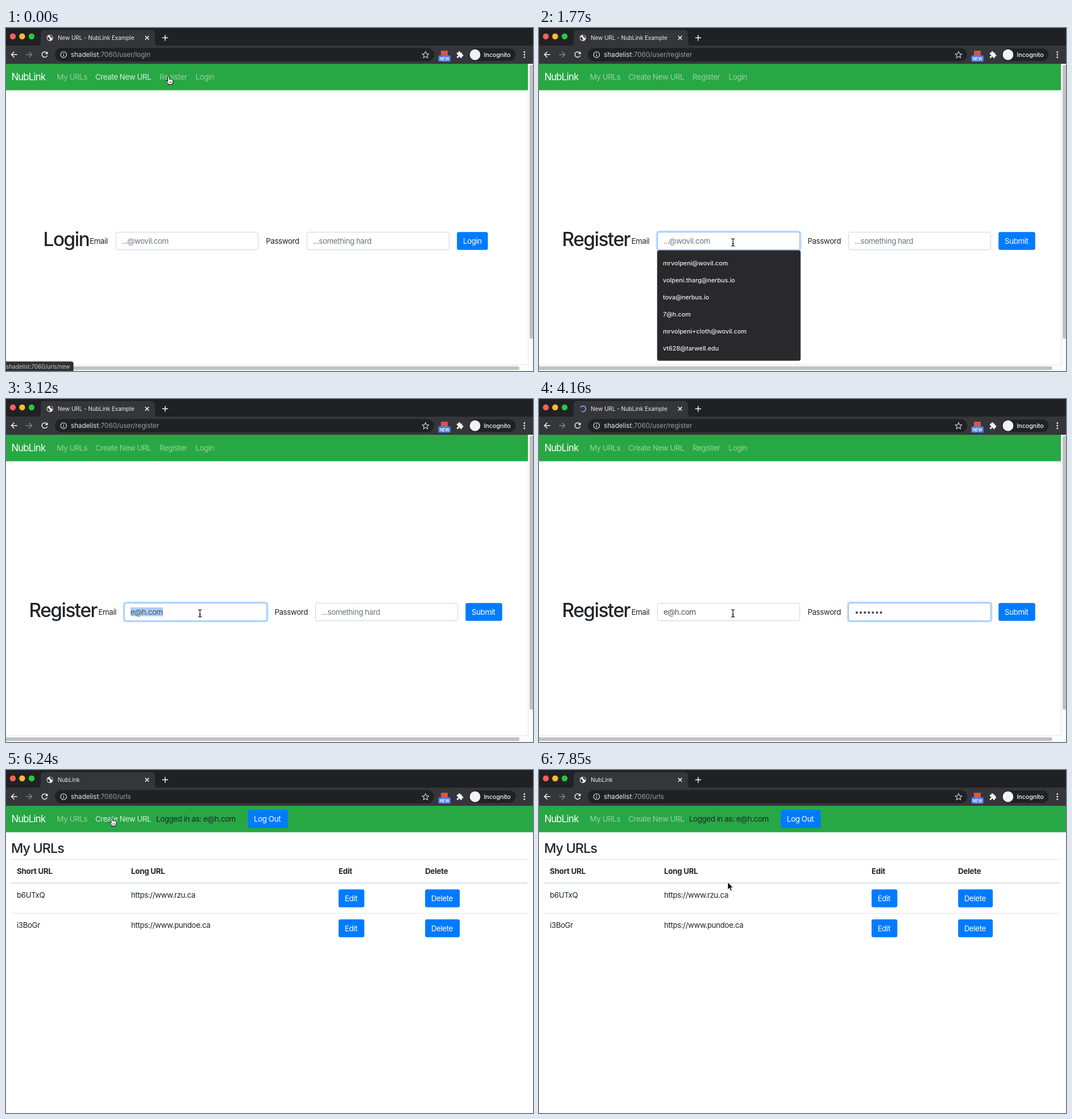
Animation of 927x604 px, one loop 8 s. Source, as an HTML page:

```html
<!DOCTYPE html>
<html lang="en">
<head>
<meta charset="utf-8">
<title>NubLink</title>
<style>
  html, body { margin: 0; width: 100%; height: 100%; overflow: hidden; background: #fff; }
  svg { display: block; width: 100vw; height: 100vh; }
  text {
    font: 400 13.36px Inter, Roboto, sans-serif;
    letter-spacing: -.031em;
    font-variant-ligatures: none;
    font-optical-sizing: none;
    fill: #212529;
    white-space: pre;
  }
  text.h1 { font-size: 33.4px; font-weight: 500; letter-spacing: -.045em; }
  text.h3 { font-size: 23.4px; font-weight: 500; letter-spacing: -.04em; }
  text.brand { font-size: 16.7px; letter-spacing: -.045em; fill: #fff; }
  text.bold { font-weight: 700; letter-spacing: -.02em; }
  text.white { fill: #fff; }
  text.hint { fill: #6c757d; }
  text.typed { fill: #495057; }
  text.link { fill: rgba(255, 255, 255, .5); }
  text.link.hover { fill: rgba(255, 255, 255, .82); }
  text.tab { font-size: 10px; letter-spacing: -.005em; fill: #e8eaed; }
  text.url { font-size: 11.7px; letter-spacing: 0; fill: #e8eaed; }
  text.mode { font-size: 10.8px; font-weight: 500; letter-spacing: -.01em; fill: #f1f3f4; }
  text.badge { font-size: 7.2px; font-weight: 600; letter-spacing: 0; fill: #fff; }
  text.option { font-size: 10.9px; font-weight: 500; letter-spacing: -.005em; fill: #ececec; }
  .btn { fill: #007bff; }
  .field { fill: #fff; stroke: #ced4da; }
  .ring { fill: none; stroke: #bfdeff; stroke-width: 2.7; }
  .ring + rect { fill: none; stroke: #80bdff; }
  .icon { fill: none; stroke: #f1f3f4; stroke-width: 1.5; stroke-linecap: square; }
  .thumb { fill: #c1c1c1; }
  .edge { fill: none; stroke: #e8e8e8; }
</style>
</head>
<body>
<svg viewBox="0 0 927 604">
  <defs>
    <g id="arrow">
      <path d="M0 0V13.2L3 10.5 5.1 15.4 7.4 14.4 5.3 9.6H9.4Z" fill="#000" stroke="#fff" stroke-width=".9"/>
    </g>
    <g id="hand">
      <path d="M-1.5 9.5V1.3a1.4 1.4 0 0 1 2.8 0V5.5a1.4 1.4 0 0 1 2.4.4 1.4 1.4 0 0 1 2.3.7 1.3 1.3 0 0 1 1.9 1.2V10q0 2-1.2 3.2V14.5H-.3V13.4Q-2 12-3.9 9.2-5 7.2-3.8 6.8-2.8 6.5-1.5 9.5Z" fill="#fff" stroke="#000"/>
      <path d="M1.6 9.5v2.8M3.6 9.5v2.8M5.5 9.5v2.8" stroke="#000" stroke-width=".7"/>
    </g>
    <g id="beam" fill="none">
      <path id="bar" d="M-3-6.5Q0-6.5 0-4.5 0-6.5 3-6.5M0-5V5M-3 6.5Q0 6.5 0 4.5 0 6.5 3 6.5M-1.5 2.2H1.5" stroke="#fff" stroke-width="2.4"/>
      <path d="M-3-6.5Q0-6.5 0-4.5 0-6.5 3-6.5M0-5V5M-3 6.5Q0 6.5 0 4.5 0 6.5 3 6.5M-1.5 2.2H1.5" stroke="#111" stroke-width="1.2"/>
    </g>
  </defs>

  <rect width="927" height="604" fill="#fff"/>

  <!-- Browser frame -->
  <rect width="927" height="32" fill="#202124"/>
  <rect y="31" width="927" height="32" fill="#35363a"/>
  <path d="M54 31.5Q61 31.5 61 25V10Q61 3.5 68 3.5H255Q262 3.5 262 10V25Q262 31.5 269 31.5Z" fill="#35363a"/>
  <circle cx="12" cy="14.8" r="5.2" fill="#ff5f57"/>
  <circle cx="28.4" cy="14.8" r="5.2" fill="#fbbd2e"/>
  <circle cx="45" cy="14.8" r="5.2" fill="#28c840"/>
  <g data-on="0-1 4-28 30-43 45-49 51-54">
    <circle cx="77.2" cy="17.3" r="5.6" fill="#e8eaed"/>
    <path d="M73 15.2L76 17.2 77.3 19.5 76.4 22Q73 20.8 72.6 17ZM76.5 12.8L78 15.3 80 16.8 82 18.3Q82.3 14 78.8 12.4Z" fill="#35363a"/>
  </g>
  <g data-on="1-4 28-30 43-45 49-51">
    <path id="spin" d="M77.2 12.3A5 5 0 1 1 72.2 17.3" fill="none" stroke="#8ab4f8" stroke-width="1.5"/>
  </g>
  <text class="tab" id="title" x="91" y="21"></text>
  <path class="icon" d="M245.4 14.6l5.4 5.4m0-5.4l-5.4 5.4" stroke-width="1.2"/>
  <path class="icon" d="M275.6 17.3h8.8M280 12.9v8.8"/>
  <path class="icon" d="M10 46.7h9M14 42.2L9.5 46.7 14 51.2"/>
  <path class="icon" d="M36 46.7h9M41 42.2L45.5 46.7 41 51.2" style="stroke:#7f8184"/>
  <path class="icon" d="M72.2 49A4.8 4.8 0 1 1 71.5 43.4"/>
  <path d="M73.4 41.2V46H68.6Z" fill="#f1f3f4"/>
  <rect x="86" y="35.3" width="667" height="23.4" rx="11.7" fill="#202124"/>
  <circle class="icon" cx="101.3" cy="47" r="5.2" style="stroke-width:1.1"/>
  <path class="icon" d="M101.3 46.8v2.6M101.3 44.4v.1" style="stroke-width:1.1"/>
  <text class="url" x="114" y="51">shadelist<tspan fill="#9aa0a6">:7060</tspan><tspan id="path" fill="#9aa0a6"></tspan></text>
  <path d="M738 41.6l1.7 3.7 4 .4-3 2.7.9 4-3.6-2.1-3.6 2.1.9-4-3-2.7 4-.4Z" fill="none" stroke="#dadce0" stroke-width="1.1"/>
  <rect x="765" y="40" width="12" height="9" fill="#d9534a"/>
  <rect x="760.5" y="48.3" width="21.5" height="11" rx="2" fill="#4a80e0"/>
  <text class="badge" x="771.2" y="56.6" text-anchor="middle">NEW</text>
  <path d="M793 43.4h2.6a1.9 1.9 0 1 1 3.6 0h2.8v3a1.9 1.9 0 1 1 0 3.6v2.8h-3a1.7 1.7 0 1 0-3.2 0H793v-3a1.7 1.7 0 1 0 0-3.2Z" fill="#f1f3f4"/>
  <rect x="814" y="36" width="82.5" height="22" rx="11" fill="#202124"/>
  <circle cx="825" cy="47" r="9.4" fill="#f1f3f4"/>
  <text class="mode" x="840.5" y="51">Incognito</text>
  <g fill="#f1f3f4">
    <circle cx="911.8" cy="42.4" r="1.4"/><circle cx="911.8" cy="47" r="1.4"/><circle cx="911.8" cy="51.6" r="1.4"/>
  </g>

  <!-- Navigation bar -->
  <rect y="63" width="927" height="46.6" fill="#28a745"/>
  <text class="brand" x="9.4" y="92.2">NubLink</text>
  <text class="link" data-link="my" x="89.5" y="91.4">My URLs</text>
  <text class="link" data-link="create" x="157" y="91.4">Create New URL</text>
  <g data-on="0-29">
    <text class="link" data-link="register" x="270" y="91.4">Register</text>
    <text class="link" x="333.5" y="91.4">Login</text>
    <rect x="918" y="63" width="9" height="541" fill="#fbfbfb"/>
    <rect y="593" width="927" height="11" fill="#fbfbfb"/>
    <path class="edge" d="M918.5 63V592.5H0"/>
    <rect class="thumb" x="921" y="65" width="7" height="482" rx="3"/>
    <rect class="thumb" x="-4" y="595.8" width="907" height="6.4" rx="3.2"/>
  </g>
  <g data-on="29-54">
    <text x="264" y="91.4">Logged in as: e@h.com</text>
    <rect class="btn" x="425.3" y="70.3" width="70.4" height="31.6" rx="3.3"/>
    <text class="white" x="436" y="91.4">Log Out</text>
  </g>

  <!-- Login and register forms -->
  <g data-on="0-3">
    <text class="h1" x="65.5" y="384.3">Login</text>
    <rect class="btn" x="793.2" y="359.2" width="54.4" height="31.6" rx="3.3"/>
    <text class="white" x="804" y="380.2">Login</text>
  </g>
  <g data-on="3-29">
    <text class="h1" x="40.5" y="384.3">Register</text>
    <rect class="btn" x="808.3" y="359.2" width="64.5" height="31.6" rx="3.3"/>
    <text class="white" x="819" y="380.2">Submit</text>
  </g>
  <g data-on="0-29" id="form">
    <text x="147.2" y="380.2">Email</text>
    <rect class="field" x="193.3" y="359.5" width="250.2" height="31" rx="3"/>
    <text class="hint" data-on="0-13" x="203.8" y="380.2">...@wovil.com</text>
    <text x="457.2" y="380.2">Password</text>
    <rect class="field" x="529.3" y="359.5" width="250.2" height="31" rx="3"/>
    <text class="hint" data-on="0-26" x="540" y="380.2">...something hard</text>
    <g data-on="10-24">
      <rect class="ring" x="191.8" y="358" width="253.2" height="34" rx="4.4"/>
      <rect x="193.3" y="359.5" width="250.2" height="31" rx="3"/>
    </g>
    <g data-on="24-29">
      <rect class="ring" x="527.8" y="358" width="253.2" height="34" rx="4.4"/>
      <rect x="529.3" y="359.5" width="250.2" height="31" rx="3"/>
    </g>
    <rect data-on="21-24" x="203.8" y="367" width="57" height="15.5" fill="#accef7"/>
    <text class="typed" id="email" x="203.8" y="380.2"></text>
    <text class="typed" data-on="26-29" x="540" y="380.2">•••••••</text>
  </g>
  <g data-on="12-13" id="menu">
    <rect x="208" y="391.7" width="252" height="194" rx="3" fill="#29292b" stroke="#454547" stroke-width=".6"/>
  </g>

  <!-- Address table -->
  <g data-on="29-44 50-54" id="table">
    <text class="h3" x="9" y="145.6">My URLs</text>
    <path d="M9 157.5H917M9 252.4H917" stroke="#dee2e6"/>
    <path d="M9 199H917" stroke="#dee2e6" stroke-width="1.8"/>
    <text class="bold" x="19" y="183.2">Short URL</text>
    <text class="bold" x="220" y="183.2">Long URL</text>
    <text class="bold" x="585" y="183.2">Edit</text>
    <text class="bold" x="737.2" y="183.2">Delete</text>
  </g>

  <g id="status">
    <path id="bubble" fill="#303134"/>
    <text class="tab" id="target" x="0" y="599.8" style="fill:#c4c7cb"></text>
  </g>
  <use id="cursor"/>
</svg>

<script>
  const LOOP = 8000, TICKS = 54, LEAD = 20;
  const HOST = 'shadelist:7060';
  const NS = 'http://www.w3.org/2000/svg';
  const $ = id => document.getElementById(id);

  function add(parent, tag, attrs, text = '') {
    const el = document.createElementNS(NS, tag);
    for (const key in attrs) el.setAttribute(key, attrs[key]);
    el.textContent = text;
    parent.append(el);
  }

  ['mrvolpeni@wovil.com', 'volpeni.tharg@nerbus.io', 'tova@nerbus.io', '7@h.com',
   'mrvolpeni+cloth@wovil.com', 'vt628@tarwell.edu'].forEach((mail, i) =>
    add($('menu'), 'text', { class: 'option', x: 218, y: 417.5 + 30.15 * i }, mail));

  [['b6UTxQ', 'https://www.rzu.ca'], ['i3BoGr', 'https://www.pundoe.ca']].forEach(([id, url], i) => {
    const y = 52.8 * i, table = $('table');
    const button = (x, width, label) => {
      add(table, 'rect', { class: 'btn', x, y: 210.2 + y, width, height: 31.6, rx: 3.3 });
      add(table, 'text', { class: 'white', x: x + 10.7, y: 231.1 + y }, label);
    };
    add(table, 'text', { x: 19, y: 225.1 + y }, id);
    add(table, 'text', { x: 220, y: 225.1 + y }, url);
    button(585, 45.3, 'Edit');
    button(737.2, 61, 'Delete');
  });

  // Each list holds [start tick, value].
  const LONG = 'New URL - NubLink Example';
  const titles = [[0, LONG], [29, 'NubLink'], [44, LONG], [50, 'NubLink']];
  const paths = [[0, '/user/login'], [3, '/user/register'], [29, '/urls'], [44, '/urls/new'], [50, '/urls']];
  const targets = [[0, '/urls/new'], [1, '/user/register'], [5, ''], [43, '/urls/new'], [45, ''], [49, '/urls'], [51, '']];
  const hovers = [[0, 'create'], [1, 'register'], [4, ''], [37, 'my'], [41, 'create'], [45, ''], [47, 'my'], [51, '']];
  const emails = [[0, ''], [13, 'e'], [16, 'e@'], [17, 'e@h'], [18, 'e@h.'], [19, 'e@h.c'], [20, 'e@h.com']];

  // Pointer route: tick, x, y, shape.
  const route = [
    [0, 286, 85, 'hand'], [3, 286, 85, 'hand'], [4, 290, 118, 'arrow'], [7, 329, 345, 'arrow'],
    [8, 339.6, 378, 'beam'], [9, 341.2, 377.4, 'beam'], [31, 341.2, 377.4, 'beam'],
    [33, 43.5, 157.5, 'arrow'], [34, 43.5, 157.5, 'arrow'], [35, 119.7, 115.3, 'arrow'],
    [36, 118, 98, 'arrow'], [37, 118, 84, 'hand'], [39, 143, 84, 'hand'], [40, 143, 84, 'hand'],
    [42, 186.5, 84.2, 'hand'], [44, 186.5, 84.2, 'hand'], [47, 118, 84, 'hand'],
    [50, 118, 84, 'hand'], [53, 332, 197.5, 'arrow'], [54, 332, 197.5, 'arrow']
  ];

  const at = (list, n) => list.filter(step => step[0] <= n).pop()[1];
  const timed = [...document.querySelectorAll('[data-on]')].map(el =>
    [el, el.dataset.on.split(' ').map(span => span.split('-').map(Number))]);
  const links = document.querySelectorAll('[data-link]');

  function moveCursor(n) {
    const i = route.findIndex(p => p[0] > n);
    const [t0, x0, y0, own] = route[i - 1], [t1, x1, y1, next] = route[i];
    const k = (n - t0) / (t1 - t0), e = k * k * (3 - 2 * k);
    $('cursor').setAttribute('href', '#' + (k ? next : own));
    $('cursor').setAttribute('transform', `translate(${x0 + (x1 - x0) * e} ${y0 + (y1 - y0) * e})`);
  }

  function showStatus(target) {
    $('status').style.display = target ? '' : 'none';
    if (!target) return;
    $('target').textContent = HOST + target;
    const w = $('target').getComputedTextLength() + 6;
    $('bubble').setAttribute('d', `M0 587.3H${w - 3.5}q3.5 0 3.5 3.5V604H0Z`);
  }

  function draw(n) {
    for (const [el, spans] of timed)
      el.style.display = spans.some(([a, b]) => n >= a && n < b) ? '' : 'none';
    for (const el of links) el.classList.toggle('hover', el.dataset.link === at(hovers, n));
    $('title').textContent = at(titles, n);
    $('path').textContent = at(paths, n);
    $('email').textContent = at(emails, n);
    $('form').setAttribute('transform', `translate(${n < 3 ? 0 : 15.2} 0)`);
    $('spin').setAttribute('transform', `rotate(${n * 75} 77.2 17.3)`);
    showStatus(at(targets, n));
    moveCursor(n);
  }

  let last = -1;
  const start = performance.now();
  function frame(now) {
    const t = Math.max(0, now - start) % LOOP;
    const n = Math.min(TICKS - 1, Math.floor((t + LEAD) * TICKS / LOOP));
    if (n !== last) draw(last = n);
    requestAnimationFrame(frame);
  }
  draw(0);
  requestAnimationFrame(frame);
</script>
</body>
</html>
```
